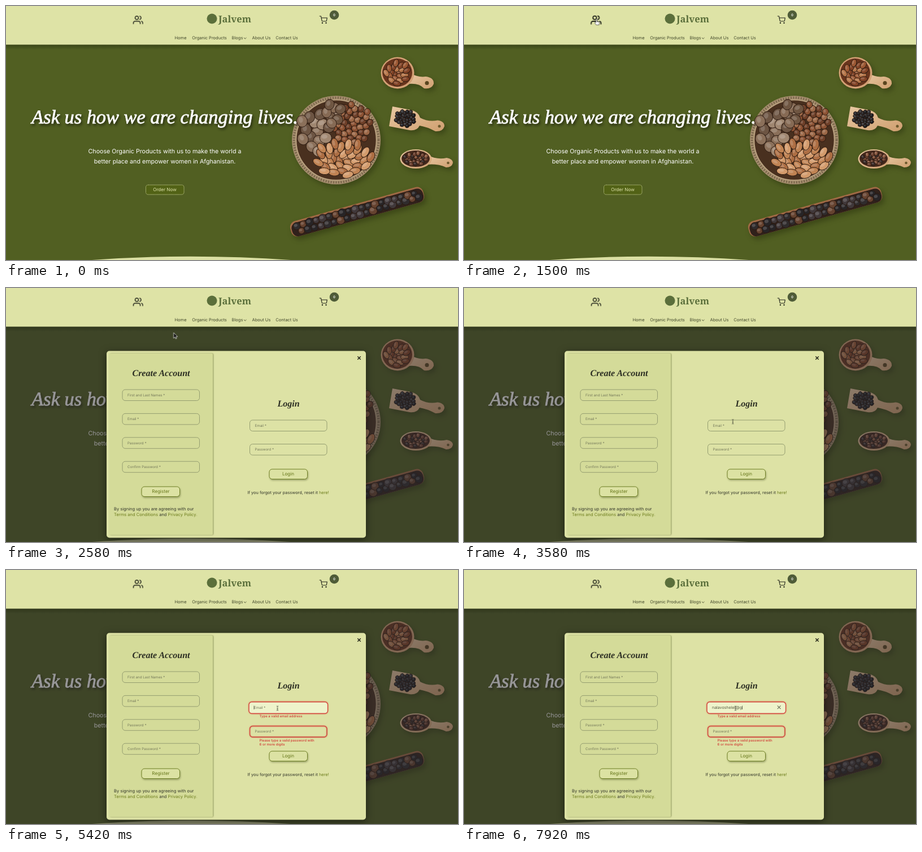
An HTML page for the animation above (8 s loop, 800 by 450 pixels).

```html
<!DOCTYPE html>
<html lang="en">
<head>
<meta charset="utf-8">
<title>Organic shop login</title>
<style>
html, body { margin: 0; width: 100%; height: 100%; overflow: hidden; background: #515f22; }
svg { display: block; width: 100vw; height: 100vh; }
text { font-family: Inter, "Open Sans", sans-serif; text-rendering: geometricPrecision; }
.mid { text-anchor: middle; }
.script { font-family: "Liberation Serif", "Noto Serif", serif; font-style: italic; text-anchor: middle; }
.headline { font-size: 34.4px; fill: #fff; stroke: #fff; stroke-width: .8; filter: drop-shadow(2px 3px 2px rgba(0,0,0,.55)); }
.title { font-size: 16px; font-weight: 700; fill: #2b2d22; }
.nav { font-size: 7.5px; fill: #42482b; }
.lead { font-size: 10.7px; fill: #fff; }
.line { fill: none; stroke: #22251a; stroke-width: 1.9; stroke-linecap: round; stroke-linejoin: round; }
.photo { filter: drop-shadow(4px 5px 5px rgba(25,32,6,.38)); }
.field { fill: none; stroke: #949d70; stroke-width: 1; }
.hint { font-size: 6.2px; fill: #74785a; }
.btn { fill: #dce2a3; stroke: #6f7f25; stroke-width: 1; filter: drop-shadow(1px 2px 1.5px rgba(60,70,20,.4)); }
.btn-text { font-size: 8.1px; fill: #66761a; text-anchor: middle; }
.note { font-size: 7.55px; fill: #34372a; }
.link { fill: #6d7d1c; }
.error { font-size: 6px; font-weight: 500; fill: #cf3a34; }
.bad { fill: none; stroke: #d4493f; stroke-width: 1.4; filter: drop-shadow(0 0 1px rgba(215,60,50,.6)); }

#shade { animation: shade 8s linear infinite; }
#modal { animation: modal 8s linear infinite; }
#errors { animation: errors 8s step-end infinite; }
#focus { animation: focus 8s step-end infinite; }
#account { transform-origin: 233.5px 25px; animation: hover 8s step-end infinite; }
#cursor { animation: move 8s ease-in-out infinite; }
#arrow { animation: arrow 8s step-end infinite; }
#hand { animation: hand 8s step-end infinite; }
#beam { animation: beam 8s step-end infinite; }

@keyframes shade { 0%, 20.8% { opacity: 0 } 20.87% { opacity: .7 } 21.8%, 100% { opacity: 1 } }
@keyframes modal { 0%, 20.8% { opacity: 0 } 20.87% { opacity: .6 } 21.8% { opacity: .93 } 25%, 100% { opacity: 1 } }
@keyframes errors { 0% { opacity: 0 } 54.2%, 100% { opacity: 1 } }
@keyframes focus { 0% { opacity: 0 } 62.5%, 100% { opacity: 1 } }
@keyframes hover {
  0% { transform: none; stroke-width: 1.9 }
  13.5% { transform: scale(1.05); stroke-width: 2.3 }
  27.2%, 100% { transform: none; stroke-width: 1.9 }
}
@keyframes move {
  0%, 1% { transform: translate(420px, 462px) }
  14.6%, 26% { transform: translate(235.5px, 28.5px) }
  43.5%, 45.8% { transform: translate(475.8px, 236.8px) }
  51.5%, 55% { transform: translate(500px, 331px) }
  61%, 100% { transform: translate(480.5px, 245px) }
}
@keyframes arrow { 0% { opacity: 1 } 13.5% { opacity: 0 } 27.2% { opacity: 1 } 43% { opacity: 0 } 47.5% { opacity: 1 } 50.5% { opacity: 0 } 56.5% { opacity: 1 } 59.5%, 100% { opacity: 0 } }
@keyframes hand { 0% { opacity: 0 } 13.5% { opacity: 1 } 27.2% { opacity: 0 } 50.5% { opacity: 1 } 56.5%, 100% { opacity: 0 } }
@keyframes beam { 0% { opacity: 0 } 43% { opacity: 1 } 47.5% { opacity: 0 } 59.5%, 100% { opacity: 1 } }
</style>
</head>
<body>
<svg viewBox="0 0 800 450">
  <defs>
    <linearGradient id="wood" x2="1" y2="1">
      <stop stop-color="#e8c8a2"/><stop offset="1" stop-color="#cf9f70"/>
    </linearGradient>
    <linearGradient id="drop" x2="0" y2="1">
      <stop stop-color="#1d240a" stop-opacity=".45"/><stop offset="1" stop-color="#1d240a" stop-opacity="0"/>
    </linearGradient>
  </defs>

  <!-- hero -->
  <rect width="800" height="450" fill="#515f22"/>
  <path d="M152 450Q325 437.500 504 450Z" fill="#dbe0a3"/>

  <g class="photo">
    <circle cx="584.500" cy="237.500" r="78.500" fill="#a48d6d"/>
    <circle cx="584.500" cy="237.500" r="75" fill="none" stroke="#6f5b43" stroke-width="4" stroke-dasharray="1.500 3"/>
    <circle cx="584.500" cy="237.500" r="71" fill="#49301f" stroke="#bfa785" stroke-width="1.500"/>
    <g id="basket"></g>
  </g>
  <g class="photo">
    <path d="M716 119Q729 127 743 125Q758 127 757 138Q753 148 740 146Q731 136 712 138Z" fill="url(#wood)"/>
    <circle cx="745" cy="136.500" r="3.500" fill="#59451f"/>
    <ellipse cx="693" cy="118.500" rx="29.500" ry="28" fill="#d3a075"/>
    <ellipse cx="692.500" cy="118" rx="26.500" ry="25" fill="#6a351d"/>
    <g id="ladle"></g>
  </g>
  <g class="photo">
    <path d="M684 178L716 184Q730 187 733 198Q748 206 764 202.500Q776 204 776 213Q773 223 760 222Q745 214 732 212Q727 222 714 220L678 213Z" fill="url(#wood)"/>
    <circle cx="767" cy="213" r="2.500" fill="#6d5a2e"/>
    <g id="scoop"></g>
  </g>
  <g class="photo">
    <path d="M746 264Q763 273 780 269Q791 271 791 278Q789 286 779 286Q764 279 745 281Z" fill="url(#wood)"/>
    <circle cx="782.500" cy="278" r="2.300" fill="#6d5a2e"/>
    <ellipse cx="725.500" cy="271" rx="28" ry="17" fill="url(#wood)"/>
    <ellipse cx="725" cy="270.500" rx="25" ry="14.500" fill="#46291d"/>
    <g id="spoon"></g>
  </g>
  <g class="photo">
    <g transform="translate(621.500 364.500) rotate(-15.700)">
      <rect x="-122" y="-14" width="244" height="28" rx="11" fill="#a06a45"/>
      <rect x="-120" y="-11" width="241" height="25" rx="10" fill="#30211b"/>
      <g id="tray"></g>
    </g>
  </g>

  <text class="script headline" x="281" y="208">Ask us how we are changing lives.</text>
  <text class="lead mid" x="281" y="261">Choose Organic Products with us to make the world a</text>
  <text class="lead mid" x="281" y="279">better place and empower women in Afghanistan.</text>
  <rect x="247.500" y="317" width="67.500" height="17" rx="4" fill="#526216" stroke="#c3cc8f" stroke-width=".9" stroke-dasharray="1.500 .7"/>
  <text class="mid" x="281" y="327.500" font-size="8.100" fill="#dfe4ac">Order Now</text>

  <rect id="shade" y="68" width="800" height="382" fill="#2c2a2e" fill-opacity=".49"/>

  <!-- header -->
  <rect y="68" width="800" height="9" fill="url(#drop)"/>
  <rect width="800" height="68.500" fill="#dee3a6"/>
  <g id="account" class="line">
    <g transform="translate(224.700 15.700) scale(.75)">
      <path d="M17 21v-2a4 4 0 0 0-4-4H5a4 4 0 0 0-4 4v2M23 21v-2a4 4 0 0 0-3-3.870M16 3.130a4 4 0 0 1 0 7.750"/>
      <circle cx="9" cy="7" r="4"/>
    </g>
  </g>
  <circle cx="364.500" cy="22.500" r="9" fill="#5b6f3b"/>
  <text x="376" y="28.500" font-size="16.500" font-weight="700" fill="#5b6f3b" style="font-family:'Noto Serif',serif">Jalvem</text>
  <g class="line" transform="translate(554.500 17.400) scale(.6)">
    <path d="M1 1h4l2.680 13.390a2 2 0 0 0 2 1.610h9.720a2 2 0 0 0 2-1.610L23 6H6"/>
    <circle cx="9" cy="21" r="1"/><circle cx="20" cy="21" r="1"/>
  </g>
  <circle cx="581" cy="16" r="8.300" fill="#4f5c38"/>
  <text class="mid" x="581" y="18.200" font-size="6" font-weight="600" fill="#fff">0</text>
  <g class="nav mid">
    <text x="309" y="59.300">Home</text>
    <text x="360" y="59.300">Organic Products</text>
    <text x="409.500" y="59.300">Blogs</text>
    <text x="452" y="59.300">About Us</text>
    <text x="497" y="59.300">Contact Us</text>
    <path d="M421 56l2.200 2.200l2.200-2.200" fill="none" stroke="#42482b" stroke-width=".9"/>
  </g>

  <!-- dialog -->
  <g id="modal">
    <rect x="178" y="111.500" width="459" height="331" rx="5" fill="#dde2a5" style="filter:drop-shadow(0 3px 7px rgba(0,0,0,.5))"/>
    <rect x="183" y="116" width="183" height="321.500" rx="2" fill="#d4db99" style="filter:drop-shadow(1px 0 1px rgba(90,100,40,.6))"/>
    <path d="M622.300 121.300l5.400 5.400m0-5.400l-5.400 5.400" stroke="#1d1f15" stroke-width="1.400"/>

    <text class="script title" x="274.500" y="156">Create Account</text>
    <g id="signup"></g>
    <rect class="btn" x="240" y="352" width="67.500" height="17.500" rx="5"/>
    <text class="btn-text" x="274" y="362.800">Register</text>
    <text class="note" x="191" y="393.500">By signing up you are agreeing with our</text>
    <text class="note" x="191" y="404.300"><tspan class="link">Terms and Conditions</tspan> and <tspan class="link">Privacy Policy.</tspan></text>

    <text class="script title" x="500" y="210">Login</text>
    <rect class="field" x="431.500" y="234" width="136.500" height="19.500" rx="5"/>
    <rect class="field" x="431.500" y="276.500" width="136.500" height="19.500" rx="5"/>
    <text class="hint" x="440.500" y="288.300">Password *</text>
    <rect class="btn" x="466" y="321" width="67.500" height="17.500" rx="5"/>
    <text class="btn-text" x="499.500" y="332">Login</text>
    <text class="note mid" style="font-size:7.400px" x="499.500" y="364.500">If you forgot your password, reset it <tspan class="link">here!</tspan></text>

    <g id="errors">
      <rect class="bad" x="431.500" y="234" width="136.500" height="19.500" rx="5"/>
      <rect class="bad" x="431.500" y="276.500" width="136.500" height="19.500" rx="5"/>
      <text class="error" x="448.500" y="261.200">Type a valid email address</text>
      <text class="error" x="448.500" y="303.500">Please type a valid password with</text>
      <text class="error" x="448.500" y="310.500">6 or more digits</text>
    </g>
    <g id="focus">
      <rect class="bad" style="fill:#eef3cb" x="430" y="233.800" width="139.500" height="20.400" rx="5"/>
    </g>
    <text id="email" class="hint" x="440.500" y="245.800">Email *</text>
    <path id="caret" d="M0 240.500v6.500" stroke="#33362a" stroke-width=".7"/>
    <path id="clear" d="M554.700 240.300l5.800 5.800m0-5.800l-5.800 5.800" stroke="#666b55" stroke-width="1.100"/>
  </g>

  <g id="cursor">
    <path id="arrow" d="M-3-5V5L-.7 2.800L.8 6L2.300 5.300L.9 2.200H4Z" fill="#111" stroke="#fff" stroke-width=".7"/>
    <path id="hand" d="M-2-4.500a1 1 0 0 1 2 0V-1l3.500.8q1 .3.800 1.500L3.500 5H-1.500L-4.200 1.200q0-1.200 1-1L-2 1Z" fill="#fff" stroke="#222" stroke-width=".7"/>
    <path id="beam" d="M-1.500-4Q0-4 0-3V3Q0 4-1.500 4M1.500-4Q0-4 0-3M0 3Q0 4 1.500 4M-1 1H1" fill="none" stroke="#3a3d30" stroke-width=".8"/>
  </g>
</svg>
<script>
const $ = id => document.getElementById(id);

function add(parent, tag, attrs, text) {
  const el = document.createElementNS('http://www.w3.org/2000/svg', tag);
  for (const k in attrs) el.setAttribute(k, attrs[k]);
  if (text) el.textContent = text;
  parent.append(el);
}

// A nut is a dark-edged ellipse with a soft highlight at its upper left.
function nut(g, x, y, rx, ry, turn, fill) {
  const at = (x, y) => `translate(${x} ${y}) rotate(${turn})`;
  add(g, 'ellipse', { rx, ry, fill, stroke: '#2b1a11', 'stroke-width': .9, transform: at(x, y) });
  add(g, 'ellipse', { rx: rx * .5, ry: ry * .4, fill: '#fff', opacity: .17, transform: at(x - rx * .2, y - ry * .25) });
}

// Fills an ellipse with nuts along a sunflower spiral.
function pile(id, n, [cx, cy, w, h], [rx, ry], tones) {
  for (let i = 0; i < n; i++) {
    const a = i * 2.4, r = Math.sqrt((i + .5) / n);
    nut($(id), cx + w * r * Math.cos(a), cy + h * r * Math.sin(a), rx, ry, i * 67 % 180, tones[i % tones.length]);
  }
}

pile('basket', 40, [611, 209, 36, 36], [6, 5.5], ['#8c5233', '#6e3f28', '#9c6847']);
pile('basket', 14, [546, 223, 27, 40], [10.5, 9.5], ['#8b705a', '#6d5543', '#a08771']);
pile('basket', 8, [580, 191, 17, 19], [9.5, 8.5], ['#866a54', '#6f5642']);
pile('basket', 36, [597, 270, 50, 31], [10, 6], ['#c08353', '#ad6e43', '#d39b6c']);
pile('ladle', 20, [692.5, 118, 21, 19.5], [7, 4.5], ['#9c5833', '#824326', '#b57549']);
pile('scoop', 34, [707, 199, 18, 14], [3.5, 3.2], ['#25252a', '#343438', '#191a1d']);
pile('spoon', 28, [725, 270.5, 21, 11], [4, 3.3], ['#6b3f2e', '#3a2b28', '#8a5840']);

const pods = ['#2f2b2c', '#40383a', '#272426', '#65422f'];
for (let i = 0; i < 38; i++) {
  const x = -110 + i * 6, size = 6.5 + Math.sin(i * 5);
  nut($('tray'), x, (i % 2 ? 5.5 : -4.5) + Math.sin(i * 3), size, size, 0, pods[i * 7 % 11 % 4]);
}

['First and Last Names *', 'Email *', 'Password *', 'Confirm Password *'].forEach((label, i) => {
  const y = 180 + i * 42.4;
  add($('signup'), 'rect', { class: 'field', x: 206, y, width: 136.5, height: 19.5, rx: 5 });
  add($('signup'), 'text', { class: 'hint', x: 215, y: y + 11.7 }, label);
});

const address = 'nalavosheler@g', email = $('email'), caret = $('caret');
const typeStart = 6080, keyGap = 140, focusAt = 5000;
let start;

function draw(now) {
  start ??= now;
  const t = (now - start) % 8000;
  const count = t < typeStart ? 0 : Math.min(address.length, 1 + Math.floor((t - typeStart) / keyGap));
  const focused = t >= focusAt;
  email.textContent = count ? address.slice(0, count) : 'Email *';
  email.setAttribute('x', focused ? 439 : 440.5);
  email.style.fontSize = count ? '7px' : '6.2px';
  email.style.fill = count ? '#55593f' : '';
  const end = count ? 439.6 + email.getComputedTextLength() : 439;
  caret.setAttribute('transform', `translate(${end} 0)`);
  caret.style.opacity = focused && (count || (t - focusAt) % 1000 < 500) ? 1 : 0;
  $('clear').style.opacity = count ? 1 : 0;
  requestAnimationFrame(draw);
}
requestAnimationFrame(draw);
</script>
</body>
</html>
```
